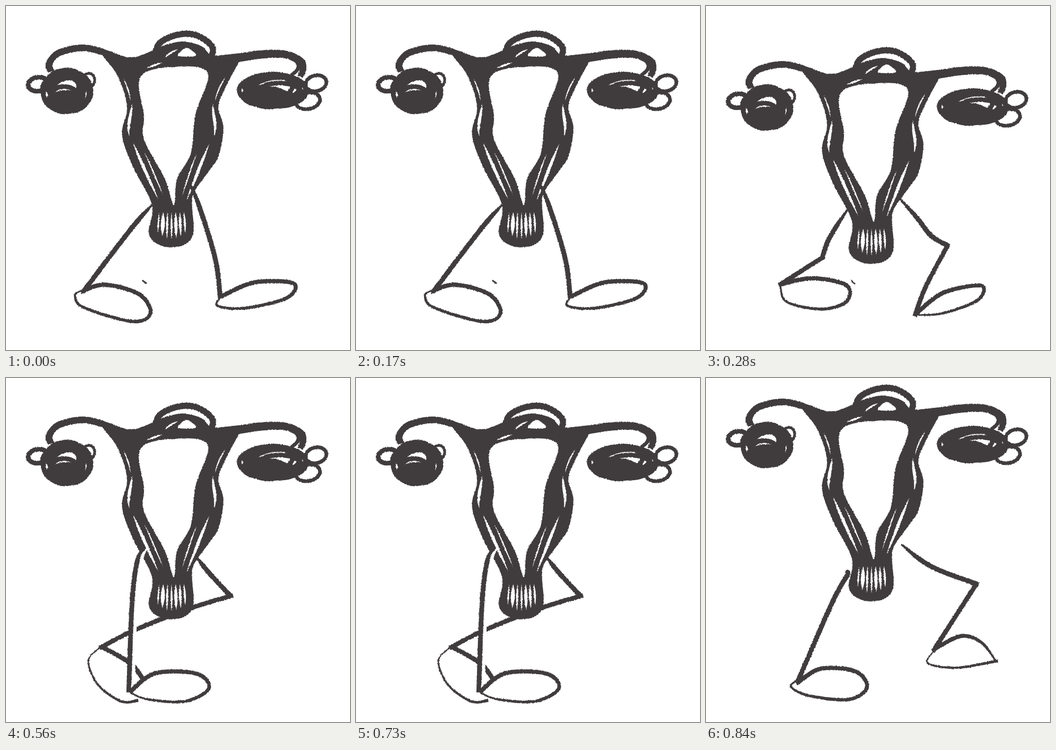
These frames come from a looping animation (748x748 px, 1040 ms). An HTML page:

```html
<!DOCTYPE html>
<html lang="en">
<head>
<meta charset="utf-8">
<title>Walking doodle</title>
<style>
html, body { margin: 0; width: 100%; height: 100%; overflow: hidden; background: #fff; }
svg { display: block; width: 100vw; height: 100vh; }
</style>
</head>
<body>
<svg viewBox="0 0 748 748">
  <defs>
    <filter id="rough" filterUnits="userSpaceOnUse" x="0" y="0" width="748" height="748" color-interpolation-filters="sRGB">
      <feTurbulence type="fractalNoise" baseFrequency="0.35" numOctaves="2" seed="4"/>
      <feDisplacementMap in="SourceGraphic" scale="3.5" xChannelSelector="R" yChannelSelector="G"/>
    </filter>
  </defs>
  <g id="back" filter="url(#rough)"></g>
  <g id="body" filter="url(#rough)"></g>
  <g id="front" filter="url(#rough)"></g>
</svg>
<script>
const INK = '#403c3e', PAPER = '#fff';
const mix = (a, b, t) => a + (b - a) * t;
const mixPoint = (p, q, t) => p.map((v, k) => mix(v, q[k], t));
const range = n => [...Array(n).keys()];
const parse = text => text.trim().split(/\s+/).map(p => p.split(',').map(Number));

let seed = 7;
const random = () => (seed = seed * 16807 % 2147483647) / 2147483647;

// Catmull-Rom samples through "x,y x,y" key points
function curve(text, closed = false, steps = 10) {
  const points = parse(text), n = points.length;
  const at = i => closed ? points[(i + n) % n] : points[Math.max(0, Math.min(n - 1, i))];
  const out = range(closed ? n : n - 1).flatMap(i => {
    const [a, b, c, d] = [at(i - 1), at(i), at(i + 1), at(i + 2)];
    return range(steps).map(s => {
      const t = s / steps;
      return b.map((v, k) => v + t / 2 * (c[k] - a[k] +
        t * (2 * a[k] - 5 * v + 4 * c[k] - d[k] + t * (3 * v - a[k] - 3 * c[k] + d[k]))));
    });
  });
  return closed ? out : [...out, points[n - 1]];
}

const polygon = (points, fill) =>
  `<path fill="${fill}" ${fill === INK ? `stroke="${INK}" stroke-width="1.5"` : ''}
    d="M${points.map(p => p.map(v => v.toFixed(1)).join(' ')).join('L')}Z"/>`;
const blob = (text, fill = INK) => polygon(curve(text, true), fill);

// Sweeps a pen along points; weight(t) is its width from start (0) to end (1)
function sweep(points, weight, fill = INK) {
  const last = points.length - 1, left = [], right = [];
  points.forEach(([x, y], i) => {
    const a = points[Math.max(0, i - 1)], b = points[Math.min(last, i + 1)];
    const scale = weight(i / last) / 2 / (Math.hypot(b[0] - a[0], b[1] - a[1]) || 1);
    const nx = (a[1] - b[1]) * scale, ny = (b[0] - a[0]) * scale;
    left.push([x + nx, y + ny]);
    right.unshift([x - nx, y - ny]);
  });
  return polygon(left.concat(right), fill);
}
const even = w => () => w;
const thin = w => t => w * Math.sin(Math.PI * t);
const swell = t => mix(2, 9, Math.min(1, t * 3));
const fade = t => 8 - 6.5 * t * t;

const brush = (text, weight) => sweep(curve(text), weight);
const thigh = text => brush(text, swell);
const shin = text => brush(text, even(8.5));
const foot = text => polygon(curve(text), PAPER) + brush(text, fade);

const loop = (cx, cy, rx, ry, width, turn = 0) =>
  `<ellipse cx="${cx}" cy="${cy}" rx="${rx}" ry="${ry}" fill="none" stroke="${INK}" stroke-width="${width}" transform="rotate(${turn} ${cx} ${cy})"/>`;

// Scribbled rings that all touch one bounding ellipse, heavier below
function coil(cx, cy, rx, ry, rings) {
  const core = `<ellipse cx="${cx}" cy="${cy + ry * .4}" rx="${rx * .75}" ry="${ry * .45}" fill="${INK}"/>`;
  return core + range(rings).map(i => {
    const size = mix(.5, .92, random()), angle = i * 2.4;
    return loop(cx + rx * (1 - size) * Math.cos(angle), cy + ry * (1 - size) * Math.sin(angle),
      rx * size, ry * size, 10);
  }).join('');
}

const torso = blob(`205,95 270,113 320,97 345,86 385,78 425,88 450,108 515,104 505,123 478,174 461,219
    472,265 462,325 443,355 408,405 404,435 407,490 392,516 360,524 328,516 311,492 318,432
    277,350 253,280 264,220 243,151`) +
  blob(`293,153 371,132 439,146 412,235 402,320 372,375 365,433 345,375 300,290 300,240`, PAPER);

// Gaps between strands: u runs across a wall, t along it
const walls = [
  ['243,150 264,205 253,275 277,350 318,432', '293,153 297,210 300,280 330,345 365,433'],
  ['490,148 464,205 472,275 443,355 404,432', '439,146 418,210 411,280 386,350 365,433']
].map(sides => sides.map(side => curve(side)));

function gap([outer, inner], u, from, to, width) {
  const last = outer.length - 1;
  const points = outer.map((p, i) => mixPoint(p, inner[i], u))
    .slice(Math.round(from * last), Math.round(to * last) + 1);
  return sweep(points, thin(width), PAPER);
}
const wallGaps = walls.map(wall =>
  gap(wall, .2, .06, .24, 3) + gap(wall, .3, .28, .52, 7) +
  gap(wall, .4, .58, .95, 7) + gap(wall, .7, .65, .92, 3)).join('');

const bulbGaps = range(7).map(i => {
  const k = i - 3;
  const points = range(9).map(s => mixPoint([360 + k * 9, 448], [360 + k * 10, 507 - k * k * 1.5], s / 8));
  return sweep(points, thin(mix(3, 9, random())), PAPER);
}).join('');

const tubes = brush('98,142 94,125 115,102 165,91 210,100 250,118 310,116', even(13)) +
  brush('322,110 335,80 375,62 415,64 448,88 446,112', even(12)) +
  brush('475,118 550,106 605,105 640,119 646,136 640,153', t => 18 - 7 * t) +
  brush('615,111 633,122 635,136 621,151', even(7));

const tubeGaps = blob('374,108 393,91 413,108', PAPER) +
  sweep(curve('306,135 322,129 340,123'), thin(4), PAPER) +
  sweep(curve('345,112 358,102 374,94'), thin(4), PAPER);

const ovaries = coil(132, 185, 53, 46, 9) + loop(70, 170, 22, 15, 10, -8) + loop(178, 163, 14, 17, 6, 25) +
  coil(580, 184, 73, 36, 9) + loop(674, 168, 23, 17, 8, -15) + loop(656, 206, 27, 18, 8, -10);

const nearLeg = curve('299,370 285,400 274,490 267,683');

const poses = [
  {
    hold: 280, y: 0, back: '',
    front: thigh('318,432 270,487 162,629') +
      foot('163,622 215,606 290,627 314,668 275,686 170,656 150,630 163,619') +
      sweep(curve('297,597 301,600 305,603'), even(2)) +
      thigh('396,378 420,435 455,550 466,635') +
      foot('467,632 540,601 625,603 610,635 520,657 460,652 467,633')
  },
  {
    hold: 280, y: 36, back: '',
    front: thigh('308,442 268,505 252,550') + shin('256,545 159,607') +
      foot('160,606 230,592 305,607 305,643 250,659 175,643 162,607') +
      sweep(curve('316,597 319,600 323,604'), even(2)) +
      thigh('418,415 460,462 490,500 528,522') + shin('526,520 478,610 454,674') +
      foot('455,671 515,624 598,608 590,640 515,668 456,672')
  },
  {
    hold: 280, y: 0,
    back: thigh('415,390 440,422 490,476') + shin('493,473 403,500 280,548 204,587') +
      shin('206,583 270,620 296,652') +
      sweep(curve('203,587 179,615 200,667 250,703 287,701'), t => 1 + 4 * t),
    front: sweep(nearLeg.map(([x, y]) => [x + 8, y]), swell, PAPER) + sweep(nearLeg, swell) +
      foot('270,682 325,642 415,643 441,675 390,703 310,699 271,685')
  },
  {
    hold: 200, y: -39, back: '',
    front: thigh('303,422 308,427 275,487 195,670') +
      foot('197,664 250,632 325,638 350,673 310,699 225,691 185,672 198,657') +
      thigh('425,362 490,410 592,449') + shin('589,446 494,594') +
      foot('497,589 555,561 600,576 631,617') +
      sweep(curve('634,615 545,630 482,620 497,592'), t => 5 - 4 * t)
  }
];

const [back, body, front] = ['back', 'body', 'front'].map(id => document.getElementById(id));
const cycle = poses.reduce((sum, pose) => sum + pose.hold, 0);
body.innerHTML = torso + tubes + tubeGaps + wallGaps + bulbGaps + ovaries;

let shown;
function render(time) {
  let rest = time % cycle;
  const pose = poses.find(p => (rest -= p.hold) < 0);
  if (pose === shown) return;
  shown = pose;
  back.innerHTML = pose.back;
  front.innerHTML = pose.front;
  body.setAttribute('transform', `translate(0 ${pose.y})`);
}

const start = performance.now();
function tick() {
  render(performance.now() - start);
  requestAnimationFrame(tick);
}
tick();
</script>
</body>
</html>
```
